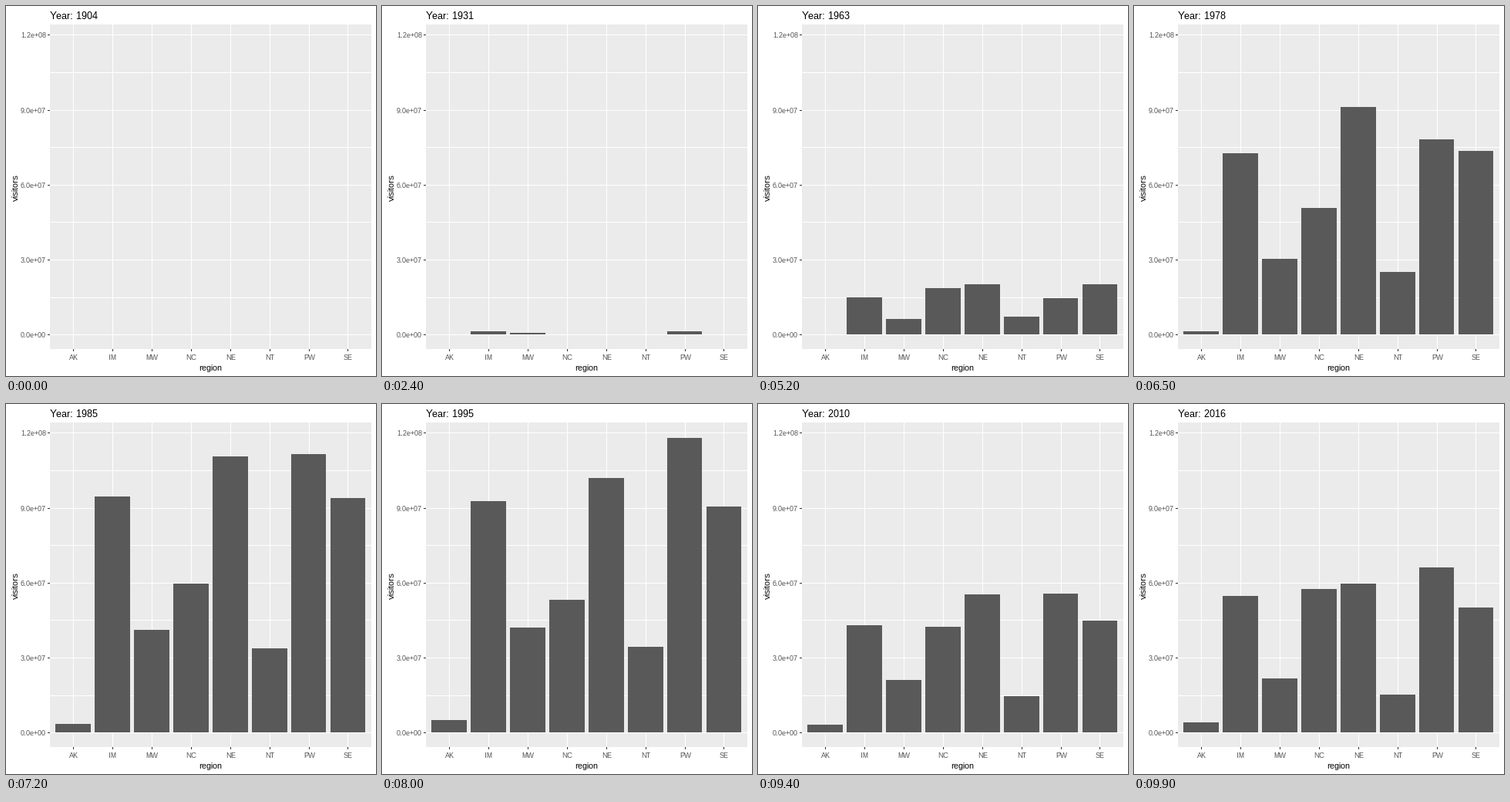
A matplotlib script that plays this animation: 480 px wide and 480 px high, repeating every 10000 ms.

```python
import matplotlib.pyplot as plt
import numpy as np
from matplotlib.animation import FuncAnimation
from matplotlib.patches import Rectangle

SIZE, FRAMES, FIRST, LAST = 480, 100, 1904, 2016
LEFT, RIGHT, TOP, BOTTOM = 57, 474, 24, 445
BASE, PX_PER_M = 426, 3.24
MID, STEP, HALF = 87.32, 50.87, 22.9

# Opening year, then yearly visitors in millions at the key years
KEY_YEARS = [1963, 1977.5, 1994.5, 2010, 2016]
REGIONS = {
    "AK": (1963, [0, 0.7, 2.55, 3.2, 4.2]),
    "IM": (1905, [15, 36.3, 46.4, 43.1, 54.8]),
    "MW": (1905, [6.3, 15.2, 21, 20.9, 21.8]),
    "NC": (1934, [18.7, 25.4, 26.6, 42.2, 57.6]),
    "NE": (1934, [20.2, 45.6, 51, 55.4, 59.5]),
    "NT": (1941, [7.3, 12.6, 17.1, 14.7, 15.2]),
    "PW": (1905, [14.7, 39.1, 59, 55.7, 66.2]),
    "SE": (1932, [20.2, 36.8, 45.3, 44.9, 50.1]),
}

plt.rcParams.update({
    "font.family": "Liberation Sans",
    "text.hinting": "native",
    "text.hinting_factor": 1,
})
fig = plt.figure(figsize=(SIZE / 72, SIZE / 72), dpi=72, facecolor="white")
ax = fig.add_axes([0, 0, 1, 1])
ax.set(xlim=(0, SIZE), ylim=(SIZE, 0))
ax.axis("off")


def box(x0, y0, x1, y1, color):
    patch = Rectangle((x0, y0), x1 - x0, y1 - y0, fc=color, lw=0, antialiased=False)
    return ax.add_patch(patch)


def label(x, y, text, size, color="black", **kw):
    kw = {"ha": "center", "va": "baseline", **kw}
    return ax.text(x, y, text, size=size, color=color, **kw)


def row(millions):
    return int(np.rint(BASE + 0.2 - millions * PX_PER_M))


def visitors(year, opened, keys):
    if year < opened:
        return 0
    # Exponential growth with a wartime dip, then key to key with a late-80s swell
    growth = np.exp(0.075 * min(year - KEY_YEARS[0], 0))
    dip = 1 - 0.65 * np.exp(-((year - 1943.5) / 1.8) ** 2)
    swell = 1 + 0.15 * np.sin(np.pi * np.clip((year - 1977.5) / 17, 0, 1))
    return np.interp(year, KEY_YEARS, keys) * growth * dip * swell


box(LEFT, TOP, RIGHT, BOTTOM, "#EBEBEB")
for m in range(0, 121, 15):
    y = row(m)
    box(LEFT, y, RIGHT, y + 1, "white")
    if m % 30 == 0:
        box(LEFT - 3, y, LEFT, y + 1, "#333333")
        label(52, y + 4, f"{m * 1e6:.1e}", 9, "#4D4D4D", ha="right")

bars = {}
for i, name in enumerate(REGIONS):
    x = MID + i * STEP
    mid = round(x)
    box(mid, TOP, mid + 1, BOTTOM, "white")
    box(mid, BOTTOM, mid + 1, BOTTOM + 3, "#333333")
    label(mid + 0.5, 459, name, 9, "#4D4D4D")
    bars[name] = box(round(x - HALF), BASE, round(x + HALF), BASE, "#595959")

label(265.5, 473, "region", 11)
label(16, 235.5, "visitors", 11, rotation=90, rotation_mode="anchor")
title = label(LEFT, 17, "", 13, ha="left")

all_years = np.arange(FIRST, LAST + 1)
slots = np.rint((all_years - FIRST) * (FRAMES - 1) / (LAST - FIRST))


def draw(k):
    # Years that round to the same frame are stacked together
    group = all_years[slots == k]
    for name, region in REGIONS.items():
        top = min(row(len(group) * visitors(group.mean(), *region)), BASE)
        bars[name].set_y(top)
        bars[name].set_height(BASE - top)
    title.set_text(f"Year: {round(FIRST + k * (LAST - FIRST) / (FRAMES - 1))}")
    return [title, *bars.values()]


anim = FuncAnimation(fig, draw, frames=FRAMES, interval=100, repeat=True, repeat_delay=0)
plt.show()
```
